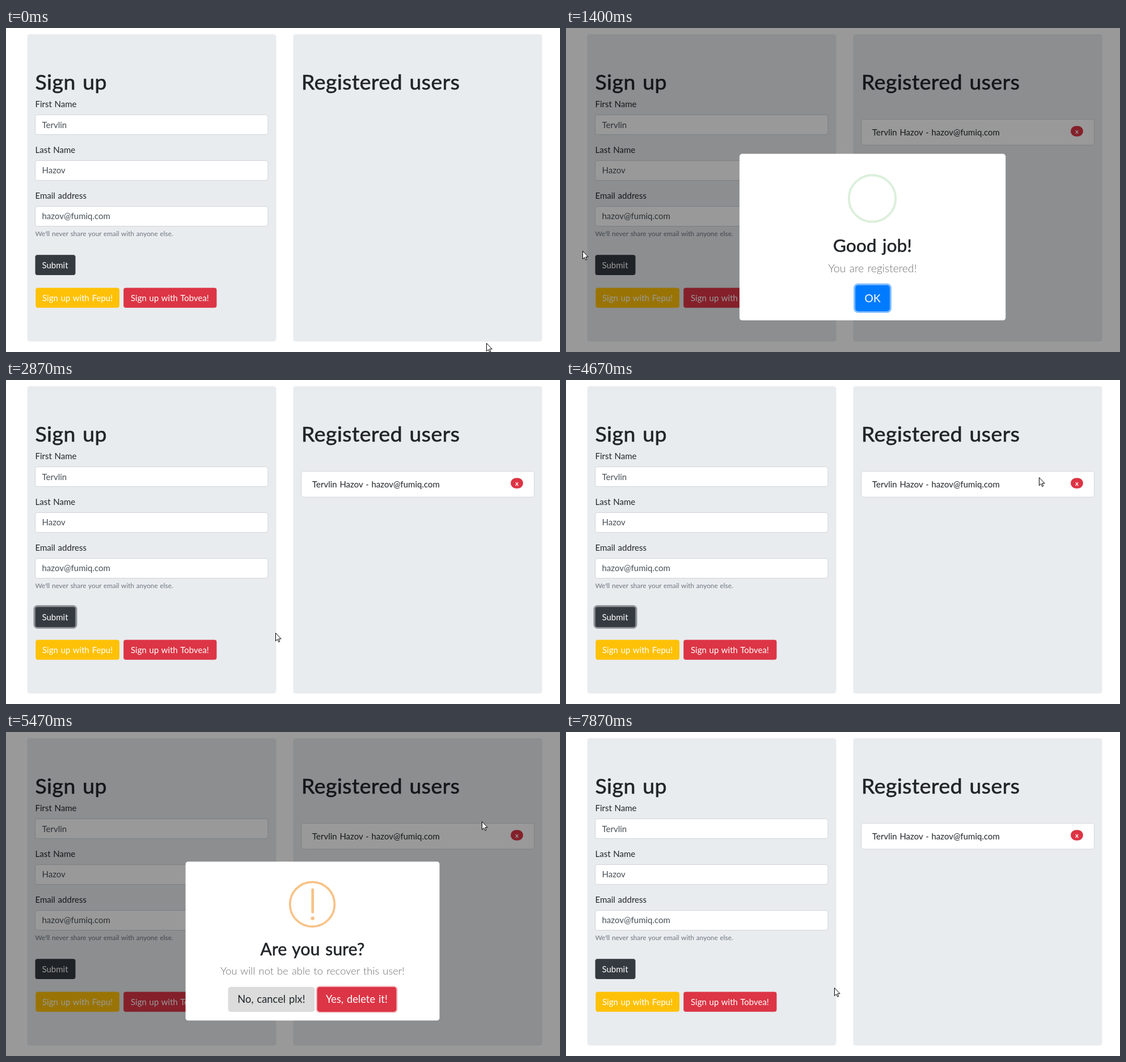
Write an HTML page that moves like this. It is 977 px wide and 573 px high and loops after 8000 ms.

```html
<!DOCTYPE html>
<html lang="en">
<head>
<meta charset="utf-8">
<title>Sign up</title>
<style>
  html, body { margin: 0; width: 100%; height: 100%; overflow: hidden; background: #fff; }
  svg { display: block; }
  text { font: 15px Lato, "Open Sans", sans-serif; fill: #212529; word-spacing: .06em; white-space: pre; }
  .h1 { font-size: 37.5px; letter-spacing: .45px; stroke: #212529; stroke-width: .65px; }
  .h2 { font-size: 32px; letter-spacing: .2px; stroke: #212529; stroke-width: .6px; }
  .small { font-size: 11.85px; fill: #6c757d; }
  .value { fill: #495057; }
  .white { fill: #fff; }
  .lead { font-size: 19.6px; font-weight: 300; fill: #707070; }
  .btn { font-size: 19.6px; }
  .badge { font-size: 11.25px; font-weight: 700; fill: #fff; }
  .field { fill: #fff; stroke: #ced4da; }
  .mid, #modal text { text-anchor: middle; }
  .line { fill: none; stroke-width: 4; }
</style>
</head>
<body>
<svg width="977" height="573" viewBox="0 0 977 573">
  <g fill="#e9ecef">
    <rect x="37.5" y="11" width="439" height="543.5" rx="4.5"/>
    <rect x="506.5" y="11" width="439" height="543.5" rx="4.5"/>
  </g>
  <text class="h1" x="51.5" y="109">Sign up</text>
  <text class="h1" x="521" y="109">Registered users</text>
  <g id="form"></g>
  <text class="small" x="51.5" y="367.5">We'll never share your email with anyone else.</text>
  <rect id="focus" x="50" y="399.7" width="74" height="38.6" rx="5.5" fill="none" stroke="#343a40" stroke-opacity=".5" stroke-width="3"/>
  <rect x="51.5" y="401.2" width="71" height="35.8" rx="4" fill="#343a40"/>
  <text class="white" x="63.5" y="425">Submit</text>
  <rect x="52.3" y="459.6" width="147.7" height="35.2" rx="4" fill="#ffc107"/>
  <text class="white" x="64" y="482.5">Sign up with Fepu!</text>
  <rect x="207.3" y="459.6" width="164.2" height="35.2" rx="4" fill="#dc3545"/>
  <text class="white" x="220" y="482.5">Sign up with Tobvea!</text>

  <g id="item">
    <rect x="521" y="161.5" width="410.5" height="45.5" rx="4" fill="#fff" stroke="#000" stroke-opacity=".125"/>
    <text x="540" y="190">Tervlin Hazov - hazov@fumiq.com</text>
    <rect x="890" y="173.3" width="22" height="18.5" rx="9.25" fill="#dc3545"/>
    <text class="badge mid" x="901" y="187">x</text>
  </g>

  <rect id="shade" width="977" height="573"/>

  <g id="modal">
    <rect width="478" height="300" rx="5" fill="#fff"/>
    <svg x="194.5" y="36.5" width="88" height="88" viewBox="0 0 88 88" overflow="visible">
      <g id="success">
        <path id="sweep" class="line" stroke="#4cae4c"/>
        <circle class="line" cx="44" cy="44" r="42" stroke="#4cae4c" stroke-opacity=".2"/>
        <path id="check" d="M21.7 42.7 37.6 58.6 69 27.2" pathLength="1" fill="none" stroke="#5cb85c" stroke-width="5"/>
      </g>
      <g id="warning">
        <circle class="line" cx="44" cy="44" r="42" stroke="currentColor"/>
        <rect x="42.2" y="14" width="5" height="47" rx="2" fill="currentColor"/>
        <circle cx="44.7" cy="70.5" r="3.5" fill="currentColor"/>
      </g>
      <g id="error">
        <circle class="line" cx="44" cy="44" r="42" stroke="#d43f3a"/>
        <path id="cross" d="M-15.5-15.5 15.5 15.5M15.5-15.5-15.5 15.5" stroke="#d9534f" stroke-width="5" stroke-linecap="round"/>
      </g>
    </svg>
    <text id="title" class="h2" x="239" y="177"></text>
    <text id="note" class="lead" x="239" y="213"></text>
    <g id="okay">
      <rect x="206.5" y="235" width="65" height="50" rx="6.5" fill="#fff" stroke="#007bff" stroke-opacity=".5" stroke-width="3"/>
      <rect id="okFace" x="208" y="236.5" width="62" height="47" rx="5"/>
      <text class="btn white" x="239" y="267">OK</text>
    </g>
    <g id="choice">
      <rect id="cancelFace" x="80" y="236.5" width="163" height="47" rx="5"/>
      <text class="btn" x="161.5" y="267">No, cancel plx!</text>
      <rect x="246.3" y="235.2" width="152" height="49.6" rx="6" fill="none" stroke="#dc3545" stroke-opacity=".29" stroke-width="2"/>
      <rect x="247.5" y="236.5" width="149.5" height="47" rx="5" fill="#dc3545"/>
      <text class="btn white" x="322" y="267">Yes, delete it!</text>
    </g>
  </g>

  <g id="cursor" fill="#fff" stroke="#000" stroke-linejoin="round">
    <path id="arrow" d="M.5.5V14.6L3.7 11.6 5.8 16.4 7.9 15.5 5.8 10.8H10.2Z"/>
    <path id="hand" d="M-1.4 12V1.6Q-1.4.3 0 .3T1.4 1.6V6.4Q3.9 5.6 4.1 7.2 6.4 6.4 6.6 8 8.9 7.6 8.9 9.4V13.5Q8.9 15.5 7.4 17.3V19.6H-.3V17.6Q-2 16-4.6 11.6-5.4 9.8-3.8 9.6-2.6 9.8-1.4 12M1.4 6.4V10M4.1 7.2V10.4M6.6 8V10.8"/>
  </g>
</svg>
<script>
const ui = id => document.getElementById(id);
const set = (id, attrs) => { for (const k in attrs) ui(id).setAttribute(k, attrs[k]); };
const show = (id, on) => { ui(id).style.display = on ? "" : "none"; };
const part = (t, from, to) => Math.max(0, Math.min(1, (t - from) / (to - from)));
const smooth = k => k * k * (3 - 2 * k);
const overshoot = k => 1 + 2.7 * (k - 1) ** 3 + 1.7 * (k - 1) ** 2;
const rad = deg => deg * Math.PI / 180;

ui("form").innerHTML = [["First Name", "Tervlin"], ["Last Name", "Hazov"], ["Email address", "hazov@fumiq.com"]]
  .map(([label, value], i) => {
    const y = 153.5 + 80.8 * i;
    return `<text x="51.5" y="${y - 13.5}">${label}</text>
      <rect class="field" x="51.5" y="${Math.floor(y) + .5}" width="410.5" height="35" rx="4"/>
      <text class="value" x="63.5" y="${y + 23}">${value}</text>`;
  }).join("");

// Times below count ticks of 1/15 s
const TICK = 1000 / 15, LOOP = 120;
const dialogs = [
  { open: 19, from: 19, to: 43, close: 40, icon: "success", hot: ["okay"],
    title: "Good job!", note: "You are registered!" },
  { open: 74, from: 74, to: 94, icon: "warning", hot: ["cancel"],
    title: "Are you sure?", note: "You will not be able to recover this user!" },
  { open: 74, from: 94, to: 118, close: 115.5, icon: "error", hot: ["okay", "cancel"],
    title: "Cancelled", note: "The user is safe :)" }
];

// Pointer moves: leave, arrive, x, y
const moves = [
  [0, 4, 60, 418], [7, 10, 29, 394], [23, 35, 530, 472], [40, 43, 475, 447],
  [48, 63, 829, 179], [69, 70, 834, 172], [70, 72, 898, 181], [76, 82, 839, 158],
  [82, 90, 455, 472], [95, 109, 468, 454], [109, 112, 530, 470], [115, 118, 473, 452]
];
function pointerAt(t) {
  let x = 847, y = 557;
  for (const [leave, arrive, toX, toY] of moves) {
    const k = smooth(part(t, leave, arrive));
    x += (toX - x) * k;
    y += (toY - y) * k;
  }
  return [Math.round(x), Math.round(y)];
}

// Clickable areas: left, top, right, bottom
const zones = {
  submit: [51, 401, 122, 437], badge: [890, 173, 912, 192],
  okay: [512, 450, 569, 495], cancel: [392, 451, 545, 495]
};
const inside = (x, y, [l, t, r, b]) => x >= l && x <= r && y >= t && y <= b;

const icons = {
  success(ms) {
    const turn = 360 * smooth(part(ms, 212, 510));
    const point = deg => `${44 + 42 * Math.sin(rad(deg))} ${44 - 42 * Math.cos(rad(deg))}`;
    const [a, b] = turn < 180 ? [135 - turn, 135] : [-45, 315 - turn];
    set("sweep", { d: b - a < .1 ? "" : `M${point(a)}A42 42 0 0 1 ${point(b)}` });
    set("check", { "stroke-dasharray": `${part(ms, 405, 650)} 2` });
  },
  warning(ms) {
    const k = 1 - Math.abs(ms / 750 % 2 - 1);
    ui("warning").style.color = `rgb(248 ${212 - 25 * k} 134)`;
  },
  error(ms) {
    const k = part(ms, 0, 500), late = part(ms, 250, 500), grow = overshoot(late);
    const flat = Math.cos(rad(100 * (1 - k)));
    set("error", { transform: `translate(0 44) scale(1 ${flat}) translate(0 -44)`, opacity: k });
    set("cross", { transform: `translate(44.5 ${70 - 26 * grow}) scale(${.4 + .6 * grow})`, opacity: late });
  }
};

function drawDialog(d, t, over) {
  const age = (t - d.open) * TICK;
  const gone = d.close ? part(t, d.close, d.close + 2.6) : 0;
  const alpha = part(age, -30, 70) * (1 - gone);
  const scale = .937 * (.5 + .5 * overshoot(part(age, 0, 250))) * (1 - gone / 2);
  set("shade", { opacity: .4 * alpha });
  set("modal", { opacity: alpha, transform: `translate(540.6 369.8) scale(${scale}) translate(-239 -150)` });
  for (const name in icons) show(name, name === d.icon);
  icons[d.icon]((t - d.from) * TICK);
  ui("title").textContent = d.title;
  ui("note").textContent = d.note;
  show("choice", d.icon === "warning");
  show("okay", d.icon !== "warning");
  set("okFace", { fill: over === "okay" ? "#0069d9" : "#007bff" });
  set("cancelFace", { fill: over === "cancel" ? "#c8c8c8" : "#dcdcdc" });
}

function draw(t) {
  const d = dialogs.find(d => t >= d.from && t < d.to);
  const [x, y] = pointerAt(t);
  const over = (d ? d.hot : ["submit", "badge"]).find(name => inside(x, y, zones[name]));
  show("item", t >= 19);
  show("focus", t >= 42 && t < 74);
  show("shade", d);
  show("modal", d);
  if (d) drawDialog(d, t, over);
  show("hand", over);
  show("arrow", !over);
  set("cursor", { transform: `translate(${x} ${y})` });
}

const start = performance.now();
function loop(now) {
  draw(Math.floor(Math.max(0, now - start) / TICK + .05) % LOOP);
  requestAnimationFrame(loop);
}
draw(0);
requestAnimationFrame(loop);
</script>
</body>
</html>
```
